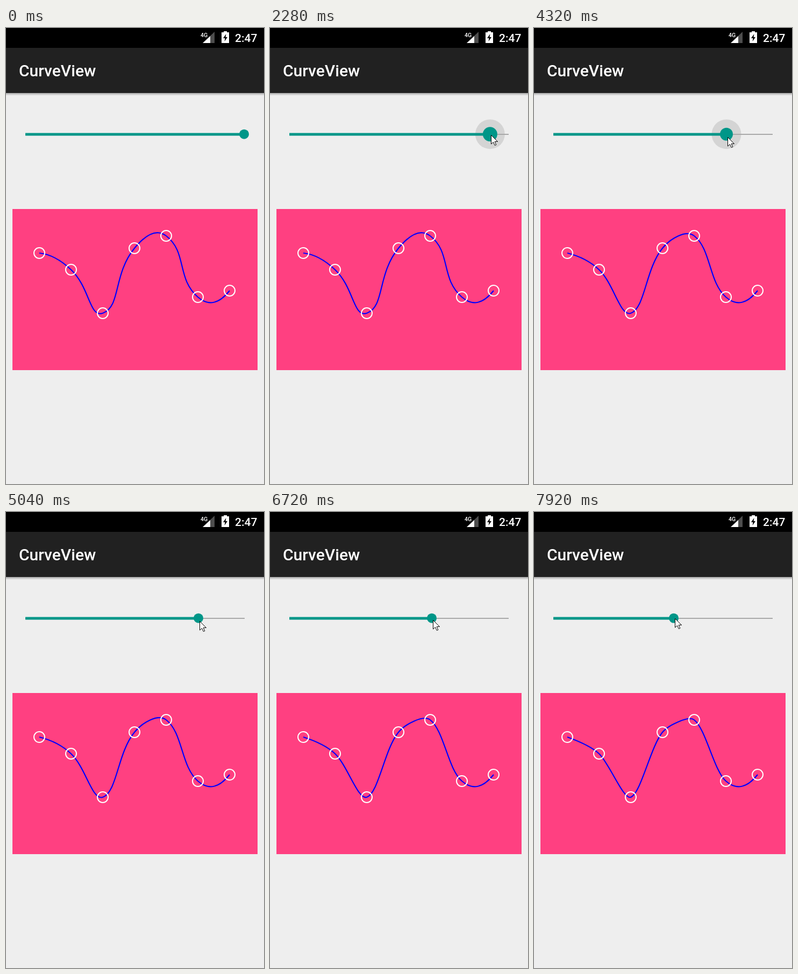
Recreate the animation shown at these times as an HTML page. Size 480 by 849 pixels, loop 8 s.

```html
<!DOCTYPE html>
<html lang="en">
<head>
<meta charset="utf-8">
<title>CurveView</title>
<style>
  html, body { margin: 0; width: 100%; height: 100%; overflow: hidden; background: #eee; }
  svg { display: block; width: 100%; height: 100%; }
  text { font-family: Roboto, sans-serif; font-weight: 500; fill: #fff; }
</style>
</head>
<body>
<svg viewBox="0 0 480 849">
  <defs>
    <linearGradient id="shade" x2="0" y2="1">
      <stop stop-color="#000" stop-opacity=".3"/>
      <stop offset="1" stop-color="#000" stop-opacity="0"/>
    </linearGradient>
  </defs>
  <rect width="480" height="849" fill="#eee"/>
  <rect y="121" width="480" height="5" fill="url(#shade)"/>
  <rect y="37" width="480" height="84" fill="#212121"/>
  <rect width="480" height="37"/>

  <!-- Status bar and title -->
  <text x="362" y="17" font-size="10.5">4G</text>
  <path d="M366 28L388 7V28Z" fill="#4d4d4d"/>
  <path d="M366 28L380 15V28Z" fill="#fff"/>
  <path d="M401 8h4V6h6v2h4v20h-14Z" fill="#fff"/>
  <path d="M409.5 11L404 19h3.5L406.5 25L412 17h-3.5Z"/>
  <text x="426" y="26" font-size="21">2:47</text>
  <text x="24" y="90" font-size="30">CurveView</text>

  <!-- Slider -->
  <circle id="halo" cy="197.7" r="27.5"/>
  <path d="M36 198H444" stroke="#a8a8a8" stroke-width="2"/>
  <path id="progress" stroke="#009688" stroke-width="5"/>
  <circle id="thumb" cy="197.7" fill="#009688"/>

  <!-- Chart -->
  <rect x="12" y="337" width="456" height="300" fill="#ff4081"/>
  <path id="curve" fill="none" stroke="#00f" stroke-width="2.2"/>
  <g id="dots" fill="none" stroke="#fff" stroke-width="2"></g>

  <path id="cursor" d="M0 0V16.5L4 13L6.8 19L9.3 18L6.7 12H12Z" fill="#fff" stroke="#000" stroke-linejoin="round"/>
</svg>
<script>
const LOOP = 8000, STEP = 120;
const ENTER = 600, ENTER_TIME = 360, APPROACH = 600, DRAG_SPEED = 0.045;
const TRACK_START = 36, TRACK_END = 443;

const points = [419, 450, 531, 410, 387, 501, 489].map((y, i) => [62 + 59 * i, y]);

// Each press jumps the thumb to `from` and drags it to `to`; y is the pointer height.
const gestures = [
  { down: 1800, up: 2760, from: 431, to: 398, y: 199 },
  { down: 3840, up: 4320, from: 358, to: 358, y: 203 },
  { down: 5640, up: 6240, from: 309.5, to: 301, y: 201 },
  { down: 7320, up: 7680, from: 260, to: 260, y: 198 }
];

const el = id => document.getElementById(id);
const set = (id, attrs) => {
  for (const name in attrs) el(id).setAttribute(name, attrs[name]);
};
const clamp = v => Math.max(0, Math.min(1, v));
const mix = (a, b, f) => a.map((v, i) => v + (b[i] - v) * f);
const add = (p, v, k) => [p[0] + v[0] * k, p[1] + v[1] * k];
const sub = (a, b) => add(a, b, -1);

// Handles follow the neighbours' direction, shared out by chord length; end spans are parabolas.
function curvePath(smoothness) {
  const last = points.length - 1;
  const chord = i => Math.hypot(...sub(points[i + 1], points[i]));
  const half = i => sub(points[i + 1], points[i - 1]).map(v => v / 2);
  const share = (i, side) => smoothness * chord(side) / (chord(i - 1) + chord(i));
  let d = `M${points[0]}Q${add(points[1], half(1), -smoothness / 2)} ${points[1]}`;
  for (let i = 1; i < last - 1; i++) {
    const out = add(points[i], half(i), share(i, i));
    const into = add(points[i + 1], half(i + 1), -share(i + 1, i));
    d += `C${out} ${into} ${points[i + 1]}`;
  }
  return d + `Q${add(points[last - 1], half(last - 1), 0.5)} ${points[last]}`;
}

function thumbAt(t) {
  const g = gestures.filter(g => g.down <= t).pop();
  return g ? Math.max(g.to, g.from - (t - g.down) * DRAG_SPEED) : TRACK_END;
}

function cursorAt(t) {
  const current = gestures.filter(g => g.down <= t).pop();
  const next = gestures.find(g => g.down > t);
  const rest = current
    ? [thumbAt(t) + 1.5, current.y]
    : mix([477, 183], [446, 200], clamp((t - ENTER) / ENTER_TIME));
  if (!next) return rest;
  const f = clamp(1 - (next.down - t) / APPROACH);
  return mix(rest, [next.from + 1.5, next.y], f * f);
}

// Thumb radius and halo opacity: the halo fades in for one step and out over two.
function pressState(t) {
  const g = gestures.filter(g => g.down <= t).pop();
  const since = g ? t - g.up : Infinity;
  if (since < 0) return [13.5, t === g.down ? 0.02 : 0.11];
  if (since === 0) return [12, 0.11];
  return since === STEP ? [9.5, 0.02] : [9, 0];
}

function draw(time) {
  const t = Math.floor(time % LOOP / STEP) * STEP;
  const x = thumbAt(t), [r, shade] = pressState(t), [cx, cy] = cursorAt(t);
  const released = gestures.filter(g => g.up <= t).pop();
  const value = released ? released.to : TRACK_END;
  set('halo', { cx: x, 'fill-opacity': shade });
  set('progress', { d: `M${TRACK_START} 198H${x}` });
  set('thumb', { cx: x, r });
  set('curve', { d: curvePath((value - TRACK_START) / (TRACK_END - TRACK_START)) });
  set('cursor', {
    transform: `translate(${Math.round(cx) + 0.5} ${Math.round(cy) + 0.5})`,
    visibility: t < ENTER ? 'hidden' : 'visible'
  });
}

el('dots').innerHTML = points.map(([x, y]) => `<circle cx="${x}" cy="${y}" r="10"/>`).join('');
const start = performance.now();
function tick() {
  draw(performance.now() - start);
  requestAnimationFrame(tick);
}
tick();
</script>
</body>
</html>
```
